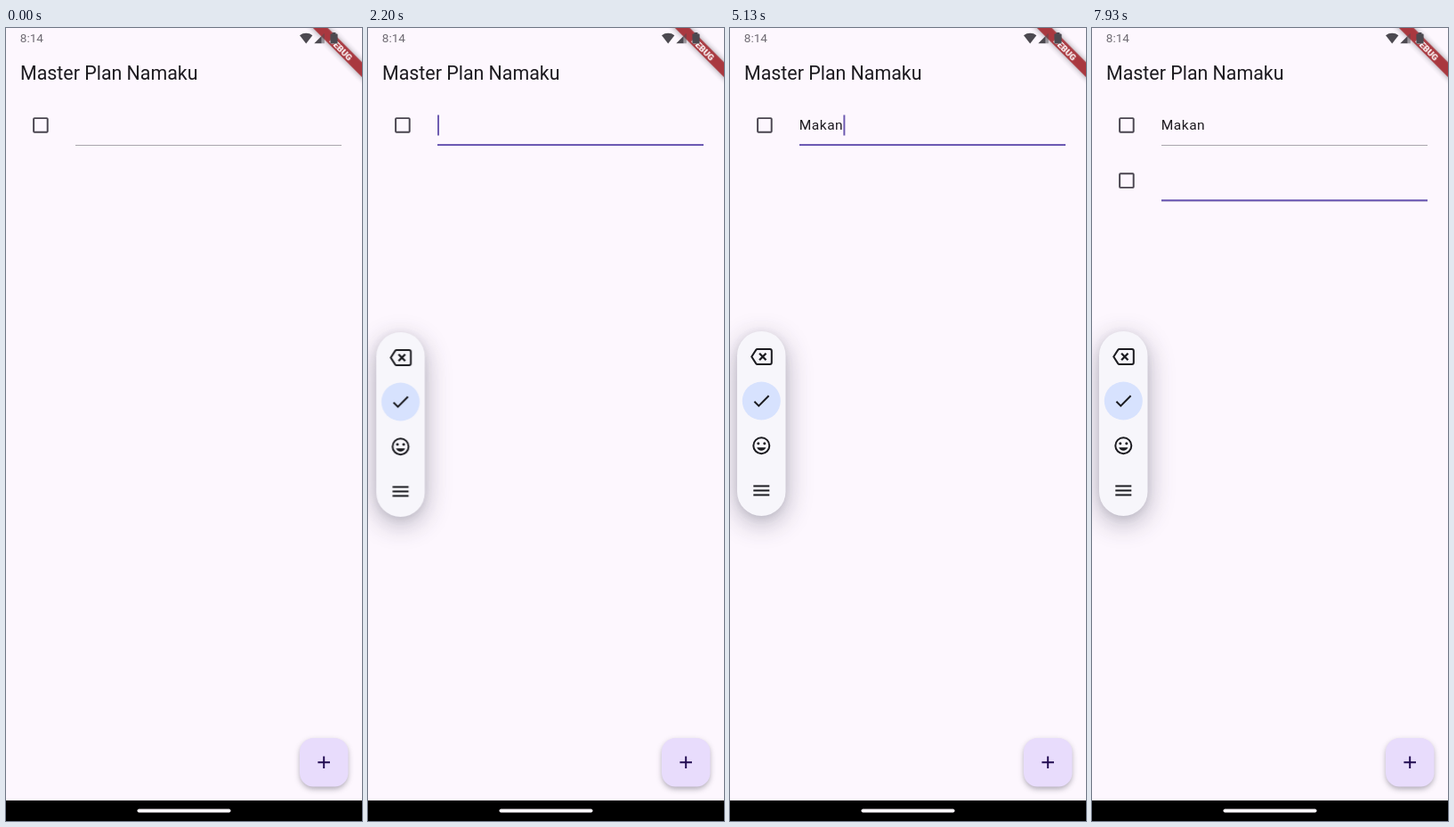
Recreate the animation shown at these times as an HTML page without scripts. Size 400 px wide and 889 px high, loop 8 s.

```html
<!DOCTYPE html>
<html lang="id">
<head>
<meta charset="utf-8">
<title>Plan list</title>
<style>
  html, body { margin: 0; width: 100%; height: 100%; overflow: hidden; background: #fdf7fe; }
  svg { display: block; width: 100vw; height: 100vh; font-family: Roboto, sans-serif; }
  .ink { fill: #1d1b20; }
  .item { font-size: 15.56px; letter-spacing: .486px; }
  .box { fill: none; stroke: #49454f; stroke-width: 1.95; }
  .thin { fill: #aaa6ad; }
  .thick { fill: #6552b0; }
  .cursor { fill: #6c59b0; }
  .status { fill: #4c4950; }
  .icon { fill: none; stroke: #1b1b20; stroke-width: 2; }
  .solid { fill: #1b1b20; stroke: none; }

  .typed, .row2, .focus1, .focus2, .caret0, .caret1, .caret2 { animation: 8s step-end infinite; opacity: 0; }
  .typed { animation-name: typed; }
  .row2 { animation-name: row2; }
  .focus1 { animation-name: focus1; }
  .focus2 { animation-name: focus2; }
  .caret0 { animation-name: caret0; }
  .caret1 { animation-name: caret1; }
  .caret2 { animation-name: caret2; }
  .panel { animation: panel 8s linear infinite; }

  @keyframes typed { 0% { opacity: 0 } 43.75%, 100% { opacity: 1 } }
  @keyframes row2 { 0% { opacity: 0 } 78.75%, 100% { opacity: 1 } }
  @keyframes focus1 { 0% { opacity: 0 } 15% { opacity: 1 } 91.25%, 100% { opacity: 0 } }
  @keyframes focus2 { 0% { opacity: 0 } 91.25%, 100% { opacity: 1 } }
  /* the caret is lit for half of every second after focus or input */
  @keyframes caret0 {
    0%, 21.25%, 33.75%, 43.75%, 100% { opacity: 0 }
    15%, 27.5%, 40% { opacity: 1 }
  }
  @keyframes caret1 {
    0%, 52.5%, 65%, 77.5%, 100% { opacity: 0 }
    43.75%, 58.75%, 71.25% { opacity: 1 }
  }
  @keyframes caret2 { 0%, 97.5%, 100% { opacity: 0 } 91.25% { opacity: 1 } }
  @keyframes panel {
    0%, 22.75% { opacity: 0; transform: translate(9.2px, 7.6px) }
    24%, 25.3% { opacity: 1; transform: translate(9.2px, 7.6px); animation-timing-function: ease-out }
    28.5%, 100% { opacity: 1; transform: none }
  }
</style>
</head>
<body>
<svg viewBox="0 0 400 889" preserveAspectRatio="none">
  <defs>
    <filter id="wide" x="-150%" y="-50%" width="400%" height="200%"><feGaussianBlur stdDeviation="15"/></filter>
    <filter id="close" x="-80%" y="-30%" width="260%" height="160%"><feGaussianBlur stdDeviation="4"/></filter>
    <filter id="soft" x="-50%" y="-50%" width="200%" height="200%"><feGaussianBlur stdDeviation="3"/></filter>
    <rect id="check" class="box" x="31.1" y="101.1" width="15.6" height="15.6" rx="1"/>
    <rect id="pill" x="8" y="340" width="54.5" height="207" rx="27.25"/>
  </defs>

  <rect width="400" height="889" fill="#fdf7fe"/>
  <text class="ink" x="16" y="57.5" font-size="21.39">Master Plan Namaku</text>

  <!-- first row -->
  <use href="#check"/>
  <rect class="thin" x="78" y="131" width="299" height="1"/>
  <rect class="thick focus1" x="78" y="130.1" width="299" height="1.95"/>
  <text class="ink item typed" x="77.8" y="114.2">Makan</text>
  <rect class="cursor caret0" x="78" y="97.5" width="1.95" height="23"/>
  <rect class="cursor caret1" x="127.4" y="97.5" width="1.95" height="23"/>

  <!-- second row -->
  <g class="row2">
    <use href="#check" y="62.2"/>
    <rect class="thin" x="78" y="193.3" width="299" height="1"/>
    <rect class="thick focus2" x="78" y="192.3" width="299" height="1.95"/>
    <rect class="cursor caret2" x="78" y="159.7" width="1.95" height="23"/>
  </g>

  <!-- add button -->
  <rect x="330.5" y="799" width="53.5" height="54" rx="15.6" fill="#5c5468" opacity=".5" filter="url(#soft)"/>
  <rect x="330" y="796" width="54.5" height="54.5" rx="15.6" fill="#e8dcfc"/>
  <path d="M350.4 823.2h13.6M357.2 816.4v13.6" stroke="#210b50" stroke-width="1.95"/>

  <!-- floating tool bar -->
  <g class="panel">
    <use href="#pill" y="8" fill="#32324a" opacity=".36" filter="url(#wide)"/>
    <use href="#pill" y="2" fill="#32324a" opacity=".1" filter="url(#close)"/>
    <use href="#pill" fill="#f7f6fb"/>
    <circle cx="35.3" cy="418" r="21.5" fill="#d7e2fe"/>
    <g class="icon" transform="translate(23.3 356.5)">
      <path d="M7.5 3.6h14q2 0 2 2v12.8q0 2-2 2h-14q-1 0-1.6-.8L1 12l4.9-7.6Q6.5 3.6 7.5 3.6z"/>
      <path d="M9.8 8.3l7.4 7.4M17.2 8.3l-7.4 7.4" stroke-width="2.3"/>
    </g>
    <path class="icon" transform="translate(23.3 406)" d="M4.1 12.7L9 17.6 20.3 6.3"/>
    <g class="icon" transform="translate(23.3 456.2)">
      <circle cx="12" cy="12" r="9"/>
      <circle class="solid" cx="8.5" cy="9.5" r="1.5"/>
      <circle class="solid" cx="15.5" cy="9.5" r="1.5"/>
      <path class="solid" d="M6.9 14h10.2a5.5 5.5 0 0 1-10.2 0z"/>
    </g>
    <path class="icon" transform="translate(23.3 506.5)" d="M3 7h18M3 12h18M3 17h18"/>
  </g>

  <!-- corner ribbon -->
  <g transform="translate(400 0) rotate(45)">
    <rect x="-45" y="27.2" width="90" height="11.7" fill="#2a2630" opacity=".5" filter="url(#soft)"/>
    <rect x="-45" y="27.2" width="90" height="11.7" fill="#a9383f"/>
    <text y="36.6" text-anchor="middle" font-size="9.9" font-weight="900" fill="#fff">DEBUG</text>
  </g>

  <!-- status bar -->
  <text x="15.8" y="16.1" font-size="13.6" fill="#6f6b73">8:14</text>
  <g class="status">
    <path d="M337.2 17.4L330 8.2a12 12 0 0 1 14.4 0z"/>
    <path d="M346.3 17.3L354.6 9v8.3z"/>
    <path d="M354.6 9l3.2-3.2v11.5h-3.2z" opacity=".5"/>
    <path d="M366.6 5h3.8v1.4h1.3q.9 0 .9.9v9.4q0 .9-.9.9h-6.4q-.9 0-.9-.9V7.3q0-.9.9-.9h1.3z"/>
  </g>

  <!-- navigation bar -->
  <rect y="866" width="400" height="23"/>
  <rect x="147.5" y="875.6" width="105" height="3.9" rx="1.95" fill="#fdf9fe"/>
</svg>
</body>
</html>
```
